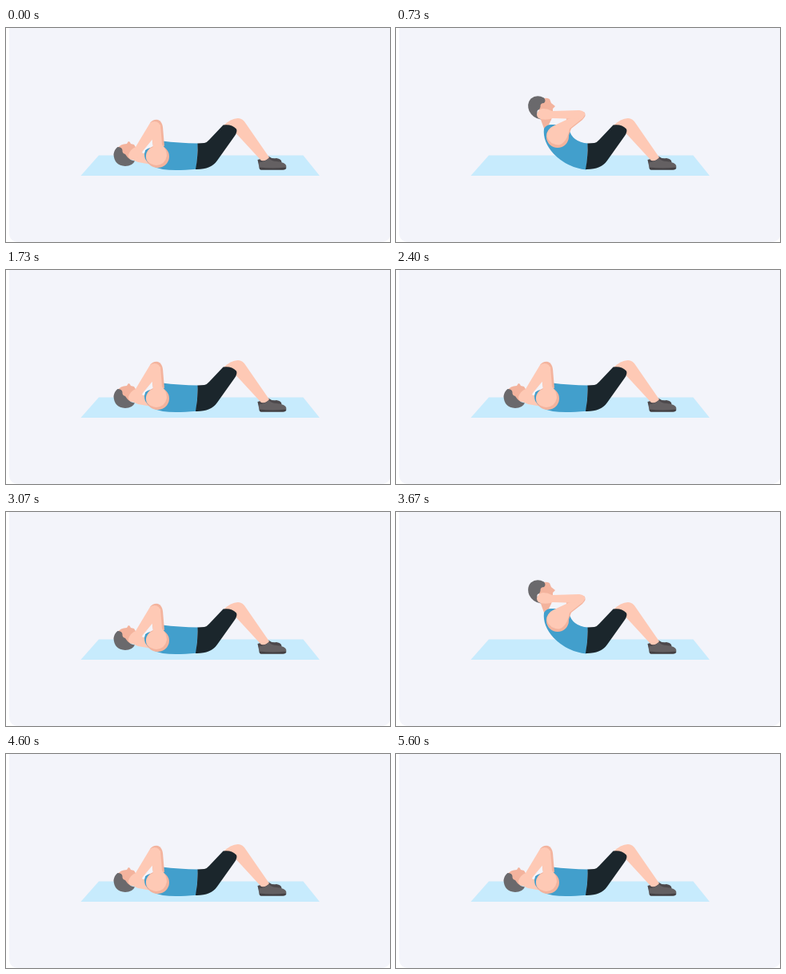
Animation, 480 px wide and 268 px high, one loop 5.67 s. Source, as an HTML page without scripts:

```html
<!DOCTYPE html>
<html lang="en">
<head>
<meta charset="utf-8">
<title>Crunches</title>
<style>
  html, body { margin: 0; width: 100%; height: 100%; overflow: hidden; background: #fff; }
  svg { display: block; width: 100%; height: 100%; }
  .skin { fill: #fec9b5; }
  .shade { fill: #f3b39d; }
  .shirt { fill: #429fcc; }
  .hair { fill: #6a696c; }
  .shorts { fill: #1b262c; }
  .mat { fill: #c7ebfd; }
  .gap { fill: #f4f4f9; }

  /* two held poses with hard switches */
  .down { animation: down 5.67s step-end infinite; }
  .up { visibility: hidden; animation: up 5.67s step-end infinite; }
  @keyframes down {
    0%, 29.45%, 74.07% { visibility: visible; }
    11.8%, 56.43% { visibility: hidden; }
  }
  @keyframes up {
    0%, 29.45%, 74.07% { visibility: hidden; }
    11.8%, 56.43% { visibility: visible; }
  }
</style>
</head>
<body>
<svg viewBox="0 0 480 268" preserveAspectRatio="none" role="img" aria-label="A man doing crunches on a mat">
  <path fill="#f3f4fa" d="M4 0H480V261Q478 268 468 268H16Q4 268 4 256Z"/>
  <path class="mat" d="M116 159.500H371.500L392 185H93.500Z"/>

  <g class="legs">
    <path fill="#4d494c" d="M314.500 165Q320 164 328 160.500Q332 164 338 163Q344.500 164 344.500 168L343 172H316Z"/>
    <path class="skin" d="M271 123Q281 113 290 113Q296 113 300 120L329 162Q326 167 319 166L284 128Z"/>
    <path fill="#646062" d="M317 168Q323 168 328.500 163Q332 167 338 167Q349.500 168 350.500 173L349 177H318Q314.500 173 317 168Z"/>
    <path fill="#434043" d="M316.500 174.500Q333 176.500 350.500 174.500Q350.500 177.500 346 177.700H319Q316.500 177.500 316.500 174.500Z"/>
  </g>

  <g class="down">
    <path class="shade" d="M139 151Q143 145 151 145L153 142Q155 142 156 145L160 146L165 154L165 166L148 163Z"/>
    <path class="skin" d="M160 155L178 156L182 171L165 168L156 164Z"/>
    <path class="hair" d="M139.500 149Q145 149 145.500 153Q145 157 149 158L152 162Q156 166 161 166.500Q158 173 149 173Q135 172 134.500 158Q135.500 152 139.500 149Z"/>
    <path class="shirt" d="M174 153Q180 149 184 150L195 141.500Q216 144 240 144.500L238 176.700Q211 179 196 177Q179 174 174 164Q172 158 174 153Z"/>
    <path class="gap" d="M168 156L175 146L179 149L174 153L173 157Z"/>
    <path class="shade" d="M180 119Q184 114 190 115Q195 117 196 124L198 148L184 149Z"/>
    <ellipse class="shade" cx="189.500" cy="161" rx="14.500" ry="14"/>
    <path class="skin" d="M181 124L193 121L195 146Q201 152 201 160Q199 171 188 172Q175 170 175 160Q176 152 184 149Z"/>
    <path class="skin" d="M180 119Q186 115 191 119Q195 124 190 131L171 154Q168 163 159 165Q153 165 153 159Q155 152 162 149Z"/>
  </g>

  <g class="up">
    <path class="shade" d="M178 90Q187 86 192 89L194 94L199 98L196 101L196 108L194 115L190 123L185 126L180 112Z"/>
    <path class="hair" d="M185 87.500Q188 91 185 94Q180 94 180.500 99Q180 102 177 103Q175 107 179 110L181 114.500Q171 113 166.500 104Q163 95 168.500 88.500Q176 82.500 185 87.500Z"/>
    <path class="shirt" d="M185 126Q188 121 194 121L207 121L216 126Q220 143 240 144.500L238 177.500Q214 175 197 157.500Q183 142 185 126Z"/>
    <path class="gap" d="M195 113L209 111L209 117L198 120.500Z"/>
    <path class="shade" d="M213 113L235 105Q239 109 233 115L219 126L214 140Z"/>
    <ellipse class="shade" cx="202" cy="136" rx="14" ry="14"/>
    <path class="skin" d="M198 122L215 114L235 108Q236 112 231 115L217 126Q214 143 204 146.500Q192 146 188.500 136Q188 127 198 122Z"/>
    <path class="skin" d="M176 108Q178 101 184 101Q190 101 195 104L229 103Q237 104 236 109Q234 113 227 114L196 113Q188 116 181 114Q176 113 176 108Z"/>
  </g>

  <path class="shorts" d="M239.500 144.500L248 144Q251 143.500 254 140L271.500 121.500Q282 120 288 126.500Q289.500 130 286 135L264 166Q256 177.500 237 177Q240 161 239.500 144.500Z"/>
</svg>
</body>
</html>
```
